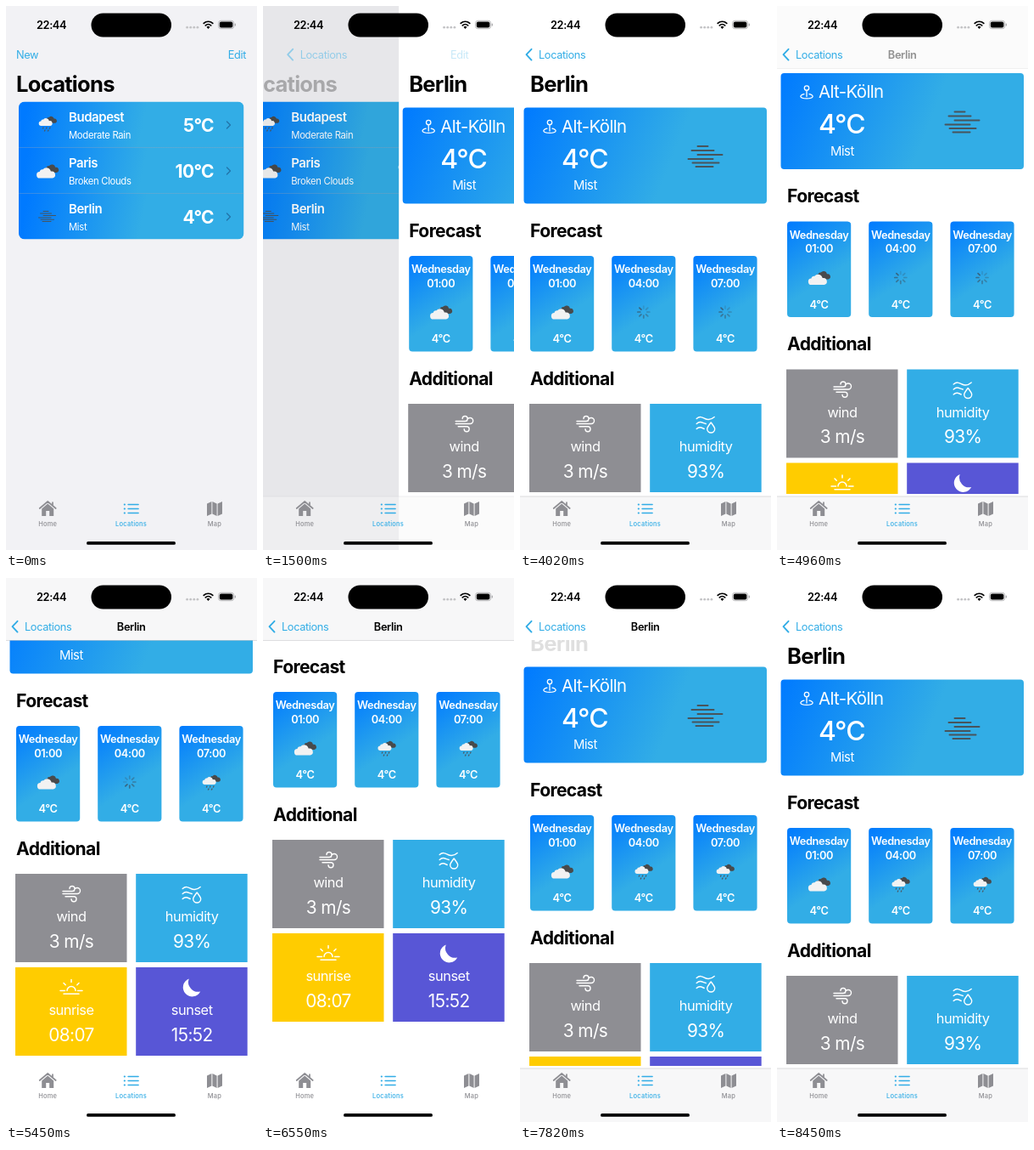
These frames come from a looping animation (296x640 px, 9.44 s). An HTML page:

```html
<!DOCTYPE html>
<html lang="en">
<head>
<meta charset="utf-8">
<title>Weather locations</title>
<style>
  html, body { margin: 0; width: 100%; height: 100%; overflow: hidden; background: #fff; }
  svg { display: block; width: 100vw; height: 100vh; }
  text { font-family: Inter, Roboto, sans-serif; letter-spacing: -.03em; }
  .tab { letter-spacing: .03em; }
  .line { fill: none; stroke-linecap: round; stroke-linejoin: round; }
</style>
</head>
<body>
<svg id="stage" viewBox="0 0 296 640"></svg>
<script>
const LOOP = 9440, W = 296, MID = 147.6;
const BLUE = '#007aff', CYAN = '#32ade6', GRAY = '#8e8e93', LIST_BG = '#f2f2f5', BAR_BG = '#f7f7f8';

// ---------- drawing helpers ----------
const text = (x, y, size, weight, str, fill = '#fff', anchor = 'start', cls = '') =>
  `<text class="${cls}" x="${x}" y="${(y + size * .364).toFixed(2)}" font-size="${size}" font-weight="${weight}" fill="${fill}" text-anchor="${anchor}">${str}</text>`;
const rect = (x, y, w, h, fill, r = 0, extra = '') =>
  `<rect x="${x}" y="${y}" width="${w}" height="${h}" rx="${r}" fill="${fill}" ${extra}/>`;
const line = (d, stroke, width) => `<path class="line" d="${d}" stroke="${stroke}" stroke-width="${width}"/>`;
const group = (x, y, body, scale = 1, id = '') =>
  `<g id="${id}" transform="translate(${x} ${y}) scale(${scale})">${body}</g>`;
const layer = (id, body) => `<g id="${id}">${body}</g>`;

let gradients = 0;
// Rectangle shaded from its top left corner towards the opposite one.
function shaded(x, y, w, h, r, from, to) {
  const id = 'grad' + gradients++;
  return `<linearGradient id="${id}" gradientUnits="userSpaceOnUse" x1="${x}" y1="${y}" x2="${x + w}" y2="${y + h}">
    <stop offset="${from}" stop-color="${BLUE}"/><stop offset="${to}" stop-color="${CYAN}"/></linearGradient>` +
    rect(x, y, w, h, `url(#${id})`, r);
}

// ---------- weather icons, centred on 0,0 ----------
const puff = (x, y, scale, fill) => group(x, y,
  `<path fill="${fill}" d="M-8.5 6.5a4.3 4.3 0 0 1-.4-8.6a3.6 3.6 0 0 1 4.4-3a6 6 0 0 1 10.6 2.6a4.5 4.5 0 0 1 2.4 9z"/>`, scale);
const clouds = puff(5, -2.5, .68, '#484a4c') + puff(-1.5, 2.8, .88, '#f2f2f2');
const rain = puff(4.2, -4, .56, '#484a4c') + puff(-2, -1.2, .64, '#f2f2f2') +
  line('M-5 5l-.5 1M-1 5l-.5 1M3 5l-.5 1M-3 8l-.5 1M1 8l-.5 1', '#4a5560', 1.3);
const mist = line('M-9-12H3M-16-7H10M-9-2H20M-20 3H9M-15 7.5H16M-11 12H9', '#48545c', 2);
const spinner = [...Array(8)].map((_, i) =>
  `<path class="line" d="M0-4V-7" stroke="#3c4a58" stroke-width="1.7" opacity="${(.2 + i * .07).toFixed(2)}" transform="rotate(${i * 45})"/>`).join('');

const wind = line('M-10-3H1a3 3 0 1 0-3-3M-10 0H7a3.5 3.5 0 1 0-3.5-3.5M-7 3.3H3a3 3 0 1 1-3 3', '#fff', 1.4);
const humidity = line('M-11-6c4-3.5 7-1.5 10 0s7 1.5 11-2M-11 0c4-3.5 6-1.5 11 0M-11 6c3-3 6-1.5 9 0' +
  'M6-1.5c3 4 4.5 5.5 4.5 7.5a4.5 4.5 0 0 1-9 0c0-2 1.5-3.5 4.5-7.5z', '#fff', 1.4);
const sunrise = line('M-5 4a5 5 0 1 1 10 0M-13 4H-7.5M7.5 4H13M-9 7.8H9M0-9v3M-9-5l2.2 2.2M9-5l-2.2 2.2', '#fff', 1.5);
const moon = '<path fill="#fff" d="M-3.5-10A11.5 11.5 0 0 0 10 5A10.8 10.8 0 1 1-3.5-10z"/>';

// ---------- list screen ----------
const cities = [
  ['Budapest', 'Moderate Rain', '5°C', group(49, 138, rain)],
  ['Paris', 'Broken Clouds', '10°C', group(49, 194, clouds)],
  ['Berlin', 'Mist', '4°C', group(48.5, 247.5, mist, .5)]
];
function cityRow([name, sky, temp, icon], i) {
  const y = 112.5 + i * 54;
  return shaded(15, y, 265.5, 54, 0, .04, .55) +
    (i ? rect(15, y - .4, 265.5, .8, 'rgba(0,40,80,.16)') : '') + icon +
    text(74, y + 18, 15, 600, name) + text(74, y + 39.5, 11.3, 400, sky) +
    text(245, y + 27.5, 21, 700, temp, '#fff', 'end') +
    line(`M260.5 ${y + 23.5}l4 4l-4 4`, 'rgba(20,60,110,.5)', 1.4);
}
const listPage = rect(0, 0, W + 100, 640, LIST_BG) +
  `<clipPath id="listClip">${rect(15, 112.5, 265.5, 162, '#000', 7)}</clipPath>` +
  `<g clip-path="url(#listClip)">${cities.map(cityRow).join('')}</g>`;
const listNav = text(12, 57.5, 12.8, 400, 'New', CYAN) + text(283, 57.5, 12.8, 400, 'Edit', CYAN, 'end') +
  text(12, 91.5, 25.6, 700, 'Locations', '#000');

// ---------- detail screen ----------
function hourCard(x, hour, icon) {
  const c = x + 37.6;
  return shaded(x, 294, 75.2, 112.5, 4, 0, .6) + text(c, 309.5, 12.8, 600, 'Wednesday', '#fff', 'middle') +
    text(c, 326, 12.8, 600, hour, '#fff', 'middle') + icon + text(c, 391.5, 12.8, 600, '4°C', '#fff', 'middle');
}
function tile(x, y, fill, icon, label, value) {
  const c = x + 66;
  return rect(x, y, 131.5, 104, fill) + group(c, y + 23.5, icon) +
    text(c, y + 50.5, 16.4, 400, label, '#fff', 'middle') + text(c, y + 79, 20.8, 400, value, '#fff', 'middle');
}
const waiting = (n, x) => group(x, 360, layer('spin' + n, spinner) + layer('rain' + n, rain));
const pin = '<circle cx="35" cy="137" r="2.7" fill="none" stroke="#fff" stroke-width="1.3"/>' +
  line('M35 140V147M32 144.2c-6 1-6 5 3 5.2c9-.2 9-4.2 3-5.2', '#fff', 1.3);

const detail = layer('bigTitle', text(12, 91.5, 25.6, 700, 'Berlin', '#000')) +
  shaded(4.5, 119.5, 286.5, 113, 4, 0, .6) + pin +
  text(49, 141.5, 20.4, 400, 'Alt-Kölln') + text(49, 179, 31.8, 500, '4°C') + text(63, 211, 14.8, 400, 'Mist') +
  group(218.5, 177, mist) +
  text(12, 264, 21.1, 700, 'Forecast', '#000') +
  hourCard(12, '01:00', group(49.8, 360, clouds)) +
  hourCard(108.2, '04:00', waiting(0, 145.8)) +
  hourCard(204.4, '07:00', waiting(1, 242)) +
  text(12, 438, 21.1, 700, 'Additional', '#000') +
  tile(11, 468, GRAY, wind, 'wind', '3 m/s') +
  tile(153.2, 468, CYAN, humidity, 'humidity', '93%') +
  tile(11, 578, '#ffcc00', sunrise, 'sunrise', '08:07') +
  tile(153.2, 578, '#5856d6', moon, 'sunset', '15:52');

const detailPage = rect(0, 0, W, 640, '#fff') +
  `<clipPath id="view">${rect(0, 73, W, 501, '#000')}</clipPath>` +
  `<g clip-path="url(#view)">${layer('scroll', detail)}</g>` +
  layer('navBar', rect(0, 0, W, 73, BAR_BG) + rect(0, 73, W, .6, '#c8c8cb')) +
  layer('smallTitle', text(MID, 57.5, 12.8, 600, 'Berlin', '#000', 'middle'));
const back = line('M13.5 50.8l-6 6.4l6 6.4', CYAN, 1.9) + text(22, 57.5, 12.8, 400, 'Locations', CYAN);

// ---------- fixed chrome ----------
const home = `<path fill="${GRAY}" d="M-7 0L0-6L7 0V8.5H2V2.5H-2V8.5H-7z"/>` +
  line('M-9.5-.5L0-8.5L9.5-.5M5.8-7.5V-4', GRAY, 1.7);
const rows = line('M-3.5-5H8.5M-3.5 0H8.5M-3.5 5H8.5', CYAN, 1.5) + line('M-7.8-5h.1M-7.8 0h.1M-7.8 5h.1', CYAN, 2.2);
const map = `<path fill="${GRAY}" d="M-9-6L-3.6-8.5V6L-9 8.5zM-2.6-8.5L2.6-6V8.5L-2.6 6zM3.6-6L9-8.5V6L3.6 8.5z"/>`;
const tabs = [['Home', home, 49.2, GRAY], ['Locations', rows, MID, CYAN], ['Map', map, 246, GRAY]]
  .map(([name, icon, x, fill]) => group(x, 591.5, icon) + text(x, 609, 7.5, 500, name, fill, 'middle', 'tab')).join('');
const status = text(36, 22.5, 12.8, 600, '22:44', '#000') + rect(100.5, 8.5, 94.5, 28, '#000', 14) +
  [0, 1, 2, 3].map(i => `<circle cx="${213.6 + i * 4.1}" cy="25.2" r="1.4" fill="#c4c4c6"/>`).join('') +
  line('M233.2 20.4a7.6 7.6 0 0 1 10.6 0M235.3 22.8a4.6 4.6 0 0 1 6.4 0', '#000', 1.7) +
  '<path d="M238.5 27l-2-2.2a2.9 2.9 0 0 1 4 0z"/>' +
  rect(250.5, 17.3, 18.2, 9.4, 'none', 3, 'stroke="#a5a5a8" stroke-width=".8"') +
  rect(251.8, 18.6, 15.6, 6.8, '#000', 1.9) + rect(269.7, 20.4, 1.2, 3.2, '#a5a5a8', .6);

document.getElementById('stage').innerHTML =
  layer('list', listPage) + layer('dim', rect(0, 0, W, 640, '#000')) +
  layer('page', detailPage) + layer('listNav', listNav) + layer('back', back) +
  layer('tabBar', rect(0, 577, W, 63, BAR_BG) + rect(0, 576.7, W, .6, '#c8c8cb')) +
  tabs + rect(95, 630, 105, 3.8, '#000', 1.9) + status;

// ---------- motion ----------
const run = (from, to, steps) => [...Array(steps)].map((_, i) => from + (to - from) * i / (steps - 1));
// The screen refreshes only at these moments.
const ticks = [0, 1360, 1500, 1630, 1760, 1910, 2080, ...run(2220, 3120, 10), ...run(3220, 4120, 10),
  ...run(4220, 5080, 9), 5220, 5330, 5450, 5560, 5670, 5830, 6350, 6550, ...run(6680, 7110, 5),
  7590, 7710, 7820, 7950, 8080, 8270, 8450];

const scrollKeys = [[4120, 0], [4220, 2], [4430, 9], [4700, 24], [5080, 62], [5220, 85], [5450, 120], [5670, 150], [5830, 160],
  [6550, 160], [6680, 138], [6790, 124], [6900, 116], [7000, 113], [7110, 112],
  [7480, 112], [7590, 95], [7710, 50], [7820, 15], [7950, 5], [8080, 2], [8270, .8], [8450, 0]];
const barKeys = [[4780, 0], [4960, 1], [7590, 1], [7820, 0]];
const smallKeys = [[4780, 0], [4980, 1], [7820, 1], [8080, 0]];
const bigKeys = [[4700, 1], [4900, 0], [7710, 0], [7820, .12], [8000, 1]];

const clamp = v => Math.max(0, Math.min(1, v));
function track(keys, t) {
  const i = keys.findIndex(k => k[0] > t);
  if (i === 0) return keys[0][1];
  if (i < 0) return keys[keys.length - 1][1];
  const [t0, a] = keys[i - 1], [t1, b] = keys[i];
  return a + (b - a) * (t - t0) / (t1 - t0);
}
// Critically damped spring for the push.
function push(t) {
  if (t >= 2080) return 1;
  const s = Math.max(0, t - 1400) * .0155;
  return 1 - (1 + s) * Math.exp(-s);
}

const $ = id => document.getElementById(id);
const move = (id, x, y = 0) => $(id).setAttribute('transform', `translate(${x.toFixed(2)} ${y.toFixed(2)})`);
const fade = (id, v) => $(id).setAttribute('opacity', clamp(v).toFixed(3));

function draw(time) {
  const t = ticks.filter(k => k <= time).pop();
  const p = push(t), off = track(scrollKeys, t);
  move('list', -.3 * W * p);
  fade('dim', p < 1 ? .1 * p : 0);
  move('page', W * (1 - p));
  move('listNav', -.3 * W * p);
  fade('listNav', 1 - 1.6 * p);
  move('back', 40 * (1 - p));
  fade('back', p);
  move('scroll', 0, -off);
  fade('navBar', track(barKeys, t));
  fade('smallTitle', track(smallKeys, t));
  fade('bigTitle', track(bigKeys, t));
  fade('tabBar', p * clamp((112 - off) / 6));
  [5600, 5000].forEach((ready, i) => {
    fade('spin' + i, t < ready ? 1 : 0);
    fade('rain' + i, t < ready ? 0 : 1);
    $('spin' + i).setAttribute('transform', `rotate(${45 * Math.floor(t / 100)})`);
  });
}

const start = performance.now();
function frame() {
  draw((performance.now() - start) % LOOP);
  requestAnimationFrame(frame);
}
frame();
</script>
</body>
</html>
```
